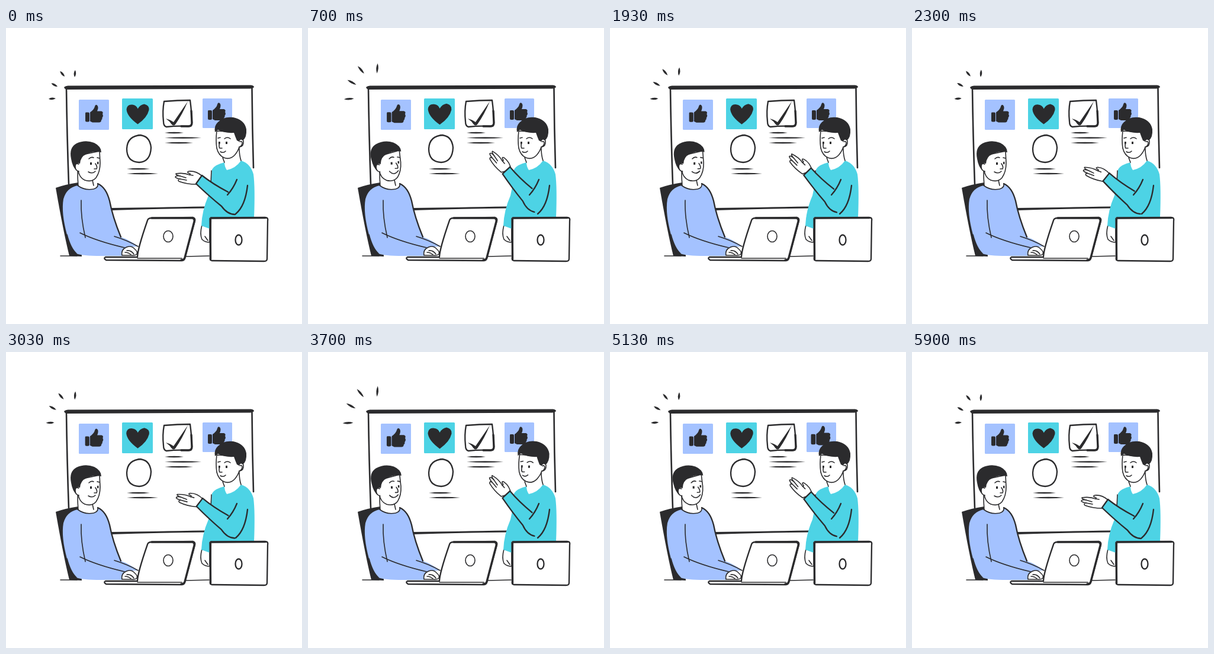
Animation, 500 px wide and 500 px high, one loop 6.63 s. Source, as an HTML page:

```html
<!DOCTYPE html>
<html lang="en">
<head>
<meta charset="utf-8">
<title>Presentation</title>
<style>
  html, body { margin: 0; width: 100%; height: 100%; overflow: hidden; background: #fff; }
  svg { display: block; width: 100vw; height: 100vh; }
  .ink { fill: #2b2b2d; }
  .blue { fill: #a4c2ff; }
  .teal { fill: #4dd3e5; }
  .paper { fill: #fff; }
  .line { fill: none; }
  .line, .edge { stroke: #2b2b2d; stroke-width: 1.6; stroke-linecap: round; stroke-linejoin: round; }
  .bold { stroke-width: 2.3; }
  .heavy { stroke-width: 3.4; }
  .soft { filter: blur(.6px); }
</style>
</head>
<body>
<svg viewBox="0 0 500 500">
  <defs>
    <g id="thumb" class="ink">
      <path d="M-14-3h4q2 0 2 2v12q0 2-2 2h-3q-2 0-2-2v-12q0-2 1-2z"/>
      <path d="M-7-3Q0-8 1-13Q2-17 5-15Q8-12 5-5H12Q16-4 14 0Q16 3 13.500 6Q14 9 12 10Q12 14 8 14H-3L-7 12Z"/>
    </g>
    <path id="ray" class="ink"/>
  </defs>

  <!-- board -->
  <path class="line heavy" d="M102 102Q103 180 106 264" style="stroke-width:2.600"/>
  <path class="line heavy" d="M415.500 102Q416 170 418 236" style="stroke-width:2.600"/>
  <path class="ink" d="M98 100Q101 97 106 97.500L414 96.500Q419 97 419 100Q416 103 411 102.500L104 104Q99 104 98 100Z"/>
  <path class="ink" d="M178 304Q250 303 338 301.500V304.500Q260 305 178 308Z"/>
  <use href="#ray" transform="translate(99 82) rotate(50)"/>
  <use href="#ray" transform="translate(116 83) rotate(94)"/>
  <use href="#ray" transform="translate(87 99) rotate(29)"/>
  <use href="#ray" transform="translate(84 119) rotate(-3)"/>

  <!-- cards -->
  <rect class="blue" x="123" y="121" width="51" height="51" rx="1.500"/>
  <rect class="teal" x="196" y="119" width="52" height="52" rx="1.500"/>
  <rect class="blue" x="332" y="119" width="50" height="50" rx="1.500"/>
  <g class="soft">
    <use href="#thumb" id="thumbA"/>
    <path class="ink" id="heart" d="M0 17Q-18 4-19-8Q-18-17-9-16Q-2-15 0-9Q4-16 11-17Q20-15 19-7Q16 6 0 17Z"/>
    <use href="#thumb" id="thumbB"/>
  </g>
  <path class="line bold" d="M267 124Q290 122 311 122Q314 145 314 161Q314 167 308 166Q290 165 271 167Q266 166 266 158Q264 140 267 124Z"/>
  <path class="line heavy" d="M313 140L314 160Q314 166 308 166L296 166"/>
  <path class="ink" d="M270 153Q278 155 283 159Q294 143 307 124Q298 146 286 163Q283 166 280 163Q276 157 270 153Z"/>
  <path class="line bold" d="M224 181Q243 181 245 202Q244 226 225 227Q204 226 204 204Q205 182 228 181"/>
  <path class="ink" id="notes"/>

  <!-- standing man -->
  <path class="paper edge" d="M331 333Q327 348 331 357Q336 362 344 362V336Z"/>
  <path class="line" d="M336 352L341 359"/>
  <path class="paper" d="M366 212L370 240L396 234L394 200Z"/>
  <path class="teal" d="M369 227Q352 231 348 239Q347 262 342 283Q331 308 330 334L344 339V320H419Q421 270 418 247Q413 229 397 224Q388 237 373 240Q369 234 369 227Z"/>
  <path class="line" d="M394 203Q394 215 397 224M366 219L369 227M347 241L346 262"/>
  <g id="headB">
    <path class="paper edge" d="M356 174Q354 190 356 203Q359 215 368 219Q378 223 386 215Q392 208 394 201Q402 200 401 191L397 176Z"/>
    <path class="ink" d="M353 176Q351 165 358 159Q367 149 384 151Q403 155 406 171Q407 185 400 190Q396 186 394 192L390 190Q387 183 385 177Q369 178 358 172Z"/>
    <path class="line" d="M395 192Q399 190 399 195Q398 200 394 201"/>
    <path class="line" d="M358 186l4-1M369 187Q374 183 379 187M361 193Q359 200 361 203L365 203M362 209Q367 212 371 208"/>
    <path class="ink" d="M359 192h2.500v4h-2.500zM371 192h3v4h-3z"/>
  </g>
  <g id="arm">
    <g id="hand">
      <path class="paper edge" d="M331 250Q321 241 309 242Q305 243 308 245Q313 246 310 248Q300 244 287 246Q286 248 294 250Q286 249 286 252Q288 254 294 255Q289 256 292 259Q305 264 321 264Z"/>
      <path class="line" d="M294 250L304 253M294 255L305 257M310 248L316 249"/>
    </g>
    <path class="teal" d="M331 249L321 263Q342 282 361 298Q371 314 386 315Q401 309 401 291L376 277Q350 264 331 249Z"/>
    <path class="line bold" d="M331 249L321 263Q343 284 364 301Q374 315 387 315"/>
    <path class="line bold" d="M331 249Q350 264 375 277"/>
  </g>
  <path class="teal" d="M390 254L374 282L386 309L399 302L409 264Z"/>
  <path class="line bold" d="M390 256Q384 271 374 282M408 266Q404 301 388 314"/>

  <!-- seated man -->
  <path class="line" d="M92 385H120M303 386L343 385"/>
  <path class="ink" d="M84 270Q101 264 122 261L128 386L107 385Q97 345 84 270Z"/>
  <path class="paper" d="M121 236L122 268Q137 281 155 268L146 250Z"/>
  <path class="line" d="M121 242Q121 255 122 267M146 257L148 266"/>
  <path class="blue" d="M121 266Q102 270 97 289Q93 312 103 349Q109 372 119 381Q129 385 160 385H196Q196 374 204 370L223 369Q207 357 194 353Q180 319 175 292Q169 269 155 263Q156 270 148 272Q133 275 121 266Z"/>
  <path class="line bold" d="M155 263Q169 269 175 292Q180 319 194 353"/>
  <path class="line" d="M121 266Q133 275 148 272Q156 270 155 263M119 381Q109 372 103 349"/>
  <path class="line" d="M127 291Q126 320 134 354M125 346Q153 360 200 371M183 352Q206 359 223 369"/>
  <g id="headA">
    <path class="paper edge" d="M120 216Q120 230 122 240Q123 252 133 257Q145 261 152 253Q159 243 159 228L158 208Z"/>
    <path class="ink" d="M110 221Q106 202 119 195Q134 188 149 194Q161 200 161 210Q148 207 136 213Q126 217 125 229L120 228Q116 232 119 241Q112 234 110 221Z"/>
    <path class="paper edge" d="M123 230Q117 227 117 234Q117 241 123 242"/>
    <path class="line" d="M140 221Q144 217 148 219M154 219L158 220M151 229Q155 235 153 238L149 238"/>
    <path class="ink" d="M142 227h3v4h-3zM154 226h2.500v4h-2.500z"/>
    <path class="line" id="smile"/>
  </g>

  <!-- laptops -->
  <path class="paper edge bold" d="M168 387H222Q222 374 239 325Q240 321 246 321L316 320Q320 321 319 326L302 389Q301 393 297 393L169 392Q164 389 168 387Z"/>
  <path class="line heavy" d="M246 321L315 321Q319 322 318 327L302 388Q301 392 296 392"/>
  <path class="line" d="M222 389H297"/>
  <ellipse class="line" cx="274" cy="352" rx="8" ry="9.500"/>
  <path class="paper edge" d="M196 384Q194 374 204 370Q212 367 217 373Q223 378 221 382Q218 385 212 384Z"/>
  <path class="line" d="M204 376Q211 375 216 382M201 379Q207 379 211 383"/>
  <path class="paper edge bold" d="M346 321L440 320.500Q443 321 442 326L441 390Q441 394 436 394L348 393Q344 393 345 388Z"/>
  <path class="line heavy" d="M345 322L345.500 391M346 321L438 320.500"/>
  <ellipse class="line bold" cx="393" cy="358" rx="5.500" ry="8.500"/>
</svg>
<script>
const $ = id => document.getElementById(id);
const set = (id, name, value) => $(id).setAttribute(name, value);
const mix = (a, b, k) => a + (b - a) * k;

const LOOP = 6630, REST = 5900;

// Smooth step from 0 to 1 between two times.
function rise(t, from, to) {
  const u = Math.min(1, Math.max(0, (t - from) / (to - from)));
  return (1 - Math.cos(Math.PI * u)) / 2;
}
// Up between a and b, held, and down again between c and d.
const swell = (t, a, b, c, d) => rise(t, a, b) - rise(t, c, d);

// A level pen stroke that thins out at both ends.
const taper = (x, y, len, w) =>
  `M${x} ${y}q${len / 2} ${w} ${len} 0q${-len / 2} ${-w} ${-len} 0Z`;

const write = (x, y, gap, lengths) =>
  lengths.map((len, i) => taper(x, y + i * gap, len, 2.6)).join('');

const turn = (id, deg, x, y) => set(id, 'transform', `rotate(${deg} ${x} ${y})`);
const place = (id, x, y, size) => set(id, 'transform', `translate(${x} ${y}) scale(${size})`);

function draw(t) {
  const ray = swell(t, 0, 1050, 1050, 2455) + swell(t, 2455, 4023, 4023, 5592);
  const arm = swell(t, 0, 750, 1700, 2600) + swell(t, 2800, 3800, 4950, 5700);
  const nod = swell(t, 150, 650, 1550, 2200) + swell(t, 3100, 3900, 5150, 5700);

  set('ray', 'd', taper(-12 - 15 * ray, 0, 12 + 6.5 * ray, 3.6));
  turn('arm', 12 * arm, 405, 291);
  turn('hand', 28 * arm, 326, 257);
  turn('headA', -4 * nod, 138, 262);
  turn('headB', 3.5 * swell(t, 3400, 4000, 4500, 5000), 382, 224);
  set('smile', 'd', `M139 ${mix(243, 242, nod)}Q146 ${mix(247, 251, nod)} ${mix(151, 154, nod)} 242`);
  place('thumbA', 149, 145.5, 1 + 0.08 * ray);
  place('heart', 222.5, 145.5, 1 + 0.06 * ray);
  place('thumbB', 356, 142, 1 + 0.1 * swell(t, 4500, 5100, 5100, 5600));
}

// The picture advances in alternating holds of 30 and 70 ms, then rests.
function hold(t) {
  const base = Math.floor(t / 100) * 100;
  return Math.min(REST, base + (t - base >= 30 ? 30 : 0));
}

set('notes', 'd', write(268, 177, 8.5, [32, 62, 48]) + write(204, 238, 8, [39, 53]));

const start = performance.now();
function tick() {
  draw(hold((performance.now() - start) % LOOP));
  requestAnimationFrame(tick);
}
tick();
</script>
</body>
</html>
```
